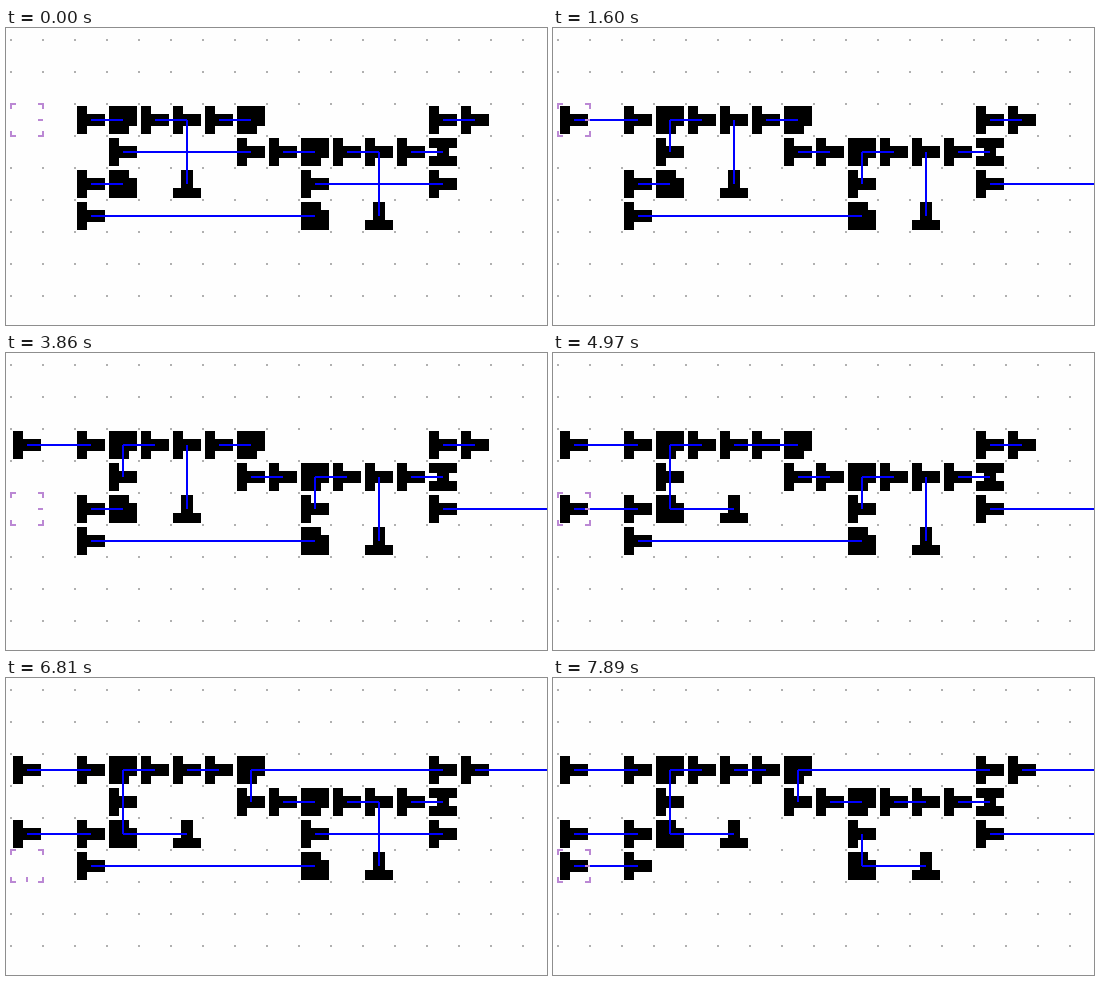
Recreate the animation shown at these times as an HTML page with a canvas. Size 541x297 px, loop 8 s.

```html
<!DOCTYPE html>
<html lang="en">
<head>
<meta charset="utf-8">
<title>Beam logic</title>
<style>
  html, body { margin: 0; width: 100%; height: 100%; overflow: hidden; background: #fefefe; }
  canvas { display: block; }
</style>
</head>
<body>
<canvas id="stage" width="541" height="297"></canvas>
<script>
const W = 541, H = 297, CELL = 32, LOOP = 8000, TICK = 100;
const ctx = document.getElementById('stage').getContext('2d');

// Directions: 0 right, 1 down, 2 left, 3 up
const STEP = [[1, 0], [0, 1], [-1, 0], [0, -1]];
const KINDS = { R: [0], U: [3], S: [0, 1], K: [0, 3], I: [1, 3] };
const FIRST_ROW = 2;
const LAYOUT = [
  '..RSRRRS.....RR',
  '...R...RRSRRRI',
  '..RK.U...R...R',
  '..R......K.U'
];

// Moments at which the picture is refreshed
const REFRESH = [0, 740, 900, 1050, 1200, 1330, 1470, 1600, 3330, 3580, 3730, 3860,
  4540, 4690, 4840, 4970, 5110, 5260, 5380, 5530, 5660, 6810, 7090, 7230,
  7490, 7630, 7760, 7890];

// [time, column, row, direction]
const CURSOR = [
  [0, 0, 2, 0], [3330, 0, 3, 1], [3580, 0, 4, 1], [3730, -1, 4, 2],
  [3860, 0, 4, 0], [6810, 0, 5, 1], [7090, -1, 5, 2], [7230, 0, 5, 0]
];

const pieces = [];
const addPiece = (col, row, kind, placed) =>
  pieces.push({ col, row, placed, dirs: KINDS[kind] });
LAYOUT.forEach((line, i) => [...line].forEach((kind, col) => {
  if (kind !== '.') addPiece(col, FIRST_ROW + i, kind, -1);
}));
addPiece(0, 2, 'R', 740);
addPiece(0, 4, 'R', 4450);
addPiece(0, 5, 'R', 7350);

const centerX = col => 21 + CELL * col;
const centerY = row => 28 + CELL * row;
const latest = (list, t, timeOf) => list.filter(item => timeOf(item) <= t).pop();

function findHit(piece, dir, time) {
  const [dx, dy] = STEP[dir];
  for (let n = 1; n < 18; n++) {
    const hit = pieces.find(p => p.placed <= time &&
      p.col === piece.col + dx * n && p.row === piece.row + dy * n);
    if (hit) return hit;
  }
}

// A piece shines unless a beam hit it on the previous tick
function advance(lit, time) {
  const blocked = new Set();
  for (const p of lit) for (const d of p.dirs) blocked.add(findHit(p, d, time));
  return new Set(pieces.filter(p => p.placed <= time && !blocked.has(p)));
}

let lit = new Set();
for (let i = 0; i < 30; i++) lit = advance(lit, 0);
const history = [lit];
for (let k = 1; k <= LOOP / TICK; k++) history.push(advance(history[k - 1], k * TICK - 5));

function drawPiece(p) {
  for (const d of p.dirs) {
    ctx.save();
    ctx.translate(centerX(p.col), centerY(p.row));
    ctx.transform(STEP[d][0], STEP[d][1], -STEP[d][1], STEP[d][0], 0, 0);
    ctx.fillRect(-14, -14, 10, 28);
    ctx.fillRect(-14, -6, 28, 12);
    ctx.restore();
  }
}

function drawLine(x1, y1, x2, y2) {
  ctx.beginPath();
  ctx.moveTo(x1, y1);
  ctx.lineTo(x2, y2);
  ctx.stroke();
}

function drawBeam(p, dir, time) {
  const x = centerX(p.col), y = centerY(p.row), [dx, dy] = STEP[dir];
  const hit = findHit(p, dir, time);
  if (hit) drawLine(x, y, centerX(hit.col), centerY(hit.row));
  else drawLine(x, y, x + dx * W, y + dy * W);
}

function drawCursor([, col, row, dir]) {
  const x = centerX(col), y = centerY(row), [dx, dy] = STEP[dir];
  for (const sx of [-1, 1]) for (const sy of [-1, 1]) {
    ctx.beginPath();
    ctx.moveTo(x + sx * 11, y + sy * 16);
    ctx.lineTo(x + sx * 16, y + sy * 16);
    ctx.lineTo(x + sx * 16, y + sy * 11);
    ctx.stroke();
  }
  drawLine(x + dx * 11, y + dy * 11, x + dx * 16, y + dy * 16);
}

function render(t) {
  const time = latest(REFRESH, t, v => v);
  ctx.fillStyle = '#fefefe';
  ctx.fillRect(0, 0, W, H);

  ctx.fillStyle = '#b0b0b0';
  for (let x = 5; x < W - 20; x += CELL)
    for (let y = 12; y < H - 20; y += CELL) ctx.fillRect(x - 1, y - 1, 2, 2);

  ctx.fillStyle = '#000';
  pieces.filter(p => p.placed <= time).forEach(drawPiece);

  ctx.lineWidth = 2;
  ctx.strokeStyle = '#00f';
  for (const p of history[Math.floor((time + 5) / TICK)])
    for (const d of p.dirs) drawBeam(p, d, time);

  ctx.strokeStyle = '#bb88d4';
  drawCursor(latest(CURSOR, time, c => c[0]));
}

function frame() {
  render(performance.now() % LOOP);
  requestAnimationFrame(frame);
}
frame();
</script>
</body>
</html>
```
